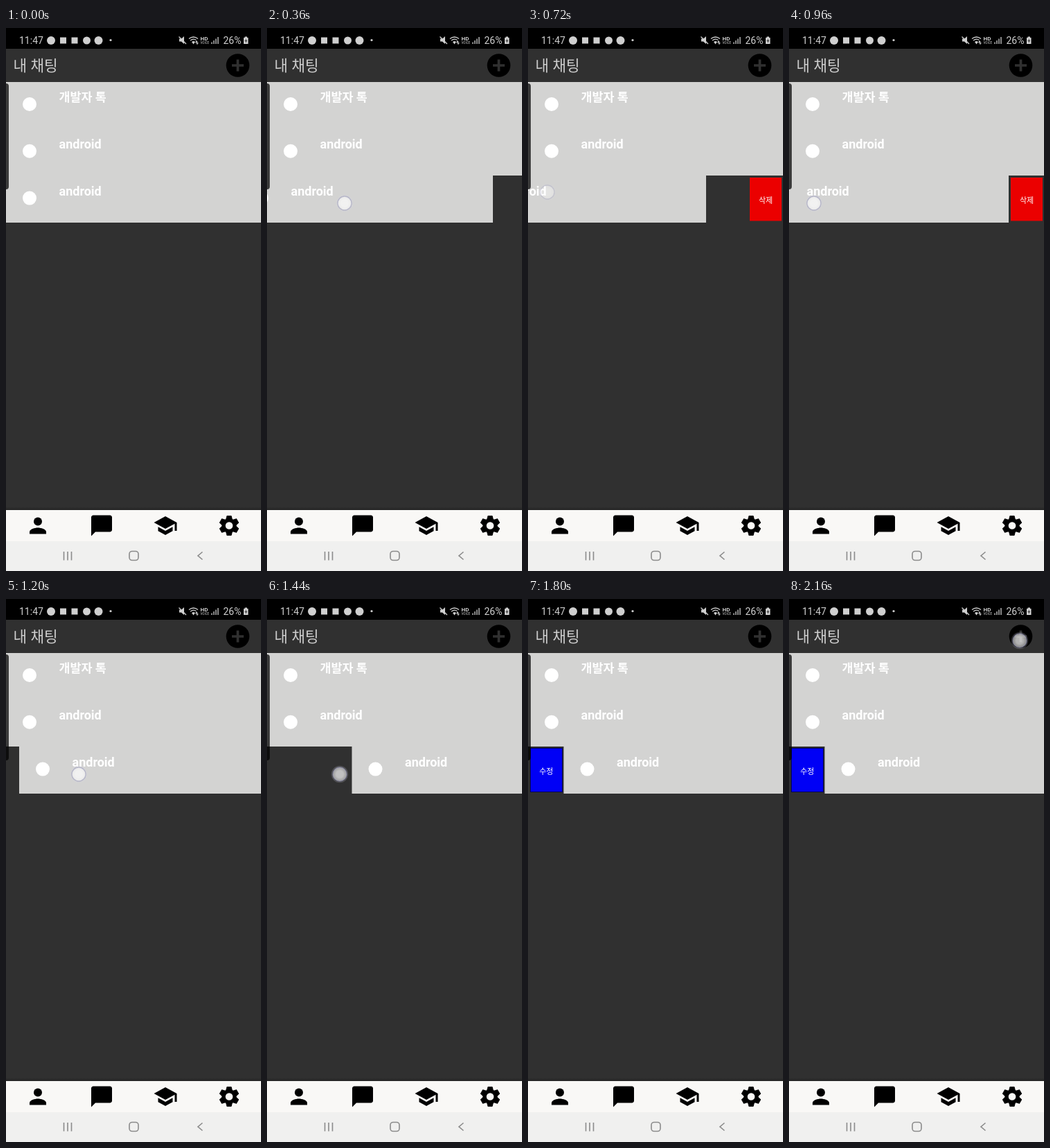
Animation, 368 px wide and 784 px high, one loop 2.28 s. Source, as an HTML page:

```html
<!DOCTYPE html>
<html lang="ko">
<head>
<meta charset="utf-8">
<title>내 채팅</title>
<style>
html, body { margin: 0; width: 100%; height: 100%; overflow: hidden; background: #303030; }
svg { display: block; }
text { font-family: Roboto, "Noto Sans CJK KR", "Noto Sans CJK", sans-serif; }
.status { font-size: 14px; fill: #cfcfcf; }
.title { font-size: 21.3px; fill: #cfcfcf; }
.name { font-weight: 700; fill: #fff; }
.label { font-size: 11px; fill: #fff; text-anchor: middle; }
.line { fill: none; stroke: #cfcfcf; stroke-width: 1.3; }
.nav { fill: none; stroke: #8b8b8b; stroke-width: 1.6; }
</style>
</head>
<body>
<svg width="368" height="784" viewBox="0 0 368 784">
  <defs>
    <linearGradient id="lift" x2="0" y2="1">
      <stop offset="0" stop-color="#000" stop-opacity="0"/>
      <stop offset="1" stop-color="#000" stop-opacity=".25"/>
    </linearGradient>
    <radialGradient id="glow">
      <stop offset=".5" stop-color="#fff" stop-opacity=".7"/>
      <stop offset="1" stop-color="#fff" stop-opacity=".52"/>
    </radialGradient>
    <path id="tooth" d="M-2.9-6L-2.1-9.3H2.1L2.9-6z" stroke="#000" stroke-width=".6" stroke-linejoin="round"/>
  </defs>

  <rect width="368" height="784" fill="#303030"/>
  <rect width="368" height="30"/>

  <!-- status bar -->
  <text class="status" x="19" y="23">11:47</text>
  <g fill="#cfcfcf">
    <circle cx="65" cy="18" r="6"/>
    <rect x="78" y="13.5" width="9" height="9"/>
    <rect x="94.5" y="13.5" width="9" height="9"/>
    <circle cx="116.5" cy="18" r="5.5"/>
    <circle cx="133.5" cy="18" r="6"/>
    <circle cx="151" cy="17.5" r="1.6"/>
    <path d="M250 15.5h3l4-3.5v11l-4-3.5h-3z"/>
    <path d="M268 20l2.5 3.5 2.5-3.5q-2.5-1.8-5 0z"/>
    <path d="M275 18l2 3h-4zM276 24l-2-2.5h4z"/>
    <path d="M344.5 12.5h3.500v1.500h1.500v9h-6.500v-9h1.500z"/>
  </g>
  <path class="line" d="M249.5 12.5l10.5 10.5"/>
  <path class="line" d="M264 15.5q6.500-5 13 0M266 18q4.500-3.500 8.500-.5"/>
  <path class="line" d="M297 23v-2.500M300 23v-5M303 23v-7.500M306 23v-10"/>
  <text x="280.5" y="17.5" font-size="8" font-weight="700" fill="#cfcfcf">HD</text>
  <text x="280.5" y="22.5" font-size="4.5" fill="#cfcfcf">VOICE</text>
  <text class="status" x="313.5" y="23">26%</text>
  <path d="M346.3 16v5M344.5 18.5h3.500" stroke="#333"/>

  <!-- title bar -->
  <text class="title" x="10.5" y="62">내 채팅</text>
  <circle cx="334.5" cy="54" r="16.8"/>
  <path d="M326 54h17M334.5 45.5v17" stroke="#303030" stroke-width="3.7"/>

  <!-- buttons behind the sliding row -->
  <g id="remove">
    <rect x="320" y="216" width="46" height="62.5" fill="#eb0000"/>
    <text class="label" x="343" y="253">삭제</text>
  </g>
  <g id="edit">
    <rect x="3.5" y="215.5" width="46" height="63" fill="#0000f6" stroke="#00005c"/>
    <text class="label" x="26.3" y="253">수정</text>
  </g>

  <g id="rows"></g>
  <path d="M0 80q4 0 4 4v145q0 4-4 4z" opacity=".72"/>

  <!-- bottom tabs -->
  <rect y="691" width="368" height="5" fill="url(#lift)"/>
  <rect y="696" width="368" height="46" fill="#f9f8f6"/>
  <rect y="741" width="368" height="43" fill="#f0f0ef"/>
  <g transform="translate(28 700.5) scale(1.5)">
    <circle cx="12" cy="8" r="4"/>
    <path d="M12 14c-2.670 0-8 1.340-8 4v2h16v-2c0-2.660-5.330-4-8-4z"/>
  </g>
  <path transform="translate(120 700.5) scale(1.5)" d="M20 2H4c-1.100 0-2 .9-2 2v18l4-4h14c1.100 0 2-.9 2-2V4c0-1.100-.9-2-2-2z"/>
  <path transform="translate(212 700.5) scale(1.5)" d="M5 13.180v4L12 21l7-3.820v-4L12 17zM12 3L1 9l11 6 9-4.910V17h2V9z"/>
  <g id="gear" transform="translate(322 718.5) scale(1.5)">
    <circle r="5.3" fill="none" stroke="#000" stroke-width="3.5"/>
  </g>
  <path class="nav" d="M83.5 756v12.500M89 756v12.500M94.500 756v12.500"/>
  <rect class="nav" x="178" y="755.5" width="13" height="13" rx="4"/>
  <path class="nav" d="M283.5 756.5l-6.500 5.500 6.500 5.500"/>

  <g id="touch">
    <circle r="11.5" fill="none" stroke="#d8d8e4" stroke-opacity=".2" stroke-width="1.5"/>
    <circle r="10" fill="url(#glow)" stroke="#9c9cbc" stroke-opacity=".6" stroke-width="1.4"/>
  </g>
</svg>
<script>
const LOOP = 2280, STEP = 120;
const $ = id => document.getElementById(id);

// [time, row offset]
const slide = [[240, 0], [360, -42], [600, -124], [720, -111], [840, -72], [960, -51],
  [1200, 19], [1440, 122.5], [1560, 104], [1680, 67], [1800, 51.5]];

// each press: [time, x, y, opacity]
const presses = [
  [[240, 152, 254, 1], [360, 112, 253, 1], [600, 34, 239, 1], [720, 28, 237, .55]],
  [[960, 36, 253, 1], [1200, 105, 253, 1], [1440, 105, 253, 1]],
  [[1920, 333, 60, .8], [2040, 333, 60, 1], [2160, 333, 60, 1]]
];

function sample(keys, t) {
  if (t <= keys[0][0]) return keys[0].slice(1);
  const i = keys.findIndex(k => k[0] >= t);
  if (i < 0) return keys[keys.length - 1].slice(1);
  const a = keys[i - 1], b = keys[i], p = (t - a[0]) / (b[0] - a[0]);
  return a.slice(1).map((v, n) => v + (b[n + 1] - v) * p);
}

// row edges snap to whole pixels so that neighbours meet without a seam
const edge = i => Math.round(78 + i * 203 / 3);
const chats = [["개발자 톡", 17.4], ["android", 18], ["android", 18]];

$("rows").innerHTML = chats.map(([name, size], i) => {
  const y = edge(i), base = 78 + i * 67.8;
  return `<g><rect y="${y}" width="368" height="${edge(i + 1) - y}" fill="#d3d3d2"/>
    <circle cx="34" cy="${base + 32}" r="10" fill="#fff"/>
    <text class="name" x="76.5" y="${base + 28}" font-size="${size}">${name}</text></g>`;
}).join("");

for (let a = 0; a < 360; a += 60)
  $("gear").insertAdjacentHTML("beforeend", `<use href="#tooth" transform="rotate(${a})"/>`);

const row = $("rows").lastElementChild;
const show = (el, on) => el.setAttribute("visibility", on ? "visible" : "hidden");

function draw(now) {
  const time = now % LOOP;
  const t = time < 240 ? 0 : Math.floor(time / STEP) * STEP;
  row.setAttribute("transform", `translate(${sample(slide, t)[0]} 0)`);
  show($("remove"), t >= 720 && t < 1200);
  show($("edit"), t >= 1560);

  const press = presses.find(p => t >= p[0][0] && t <= p[p.length - 1][0]);
  show($("touch"), press);
  if (press) {
    const [x, y, alpha] = sample(press, t);
    $("touch").setAttribute("transform", `translate(${x} ${y})`);
    $("touch").setAttribute("opacity", alpha);
  }
}

const start = performance.now();
function tick() {
  draw(performance.now() - start);
  requestAnimationFrame(tick);
}
tick();
</script>
</body>
</html>
```
